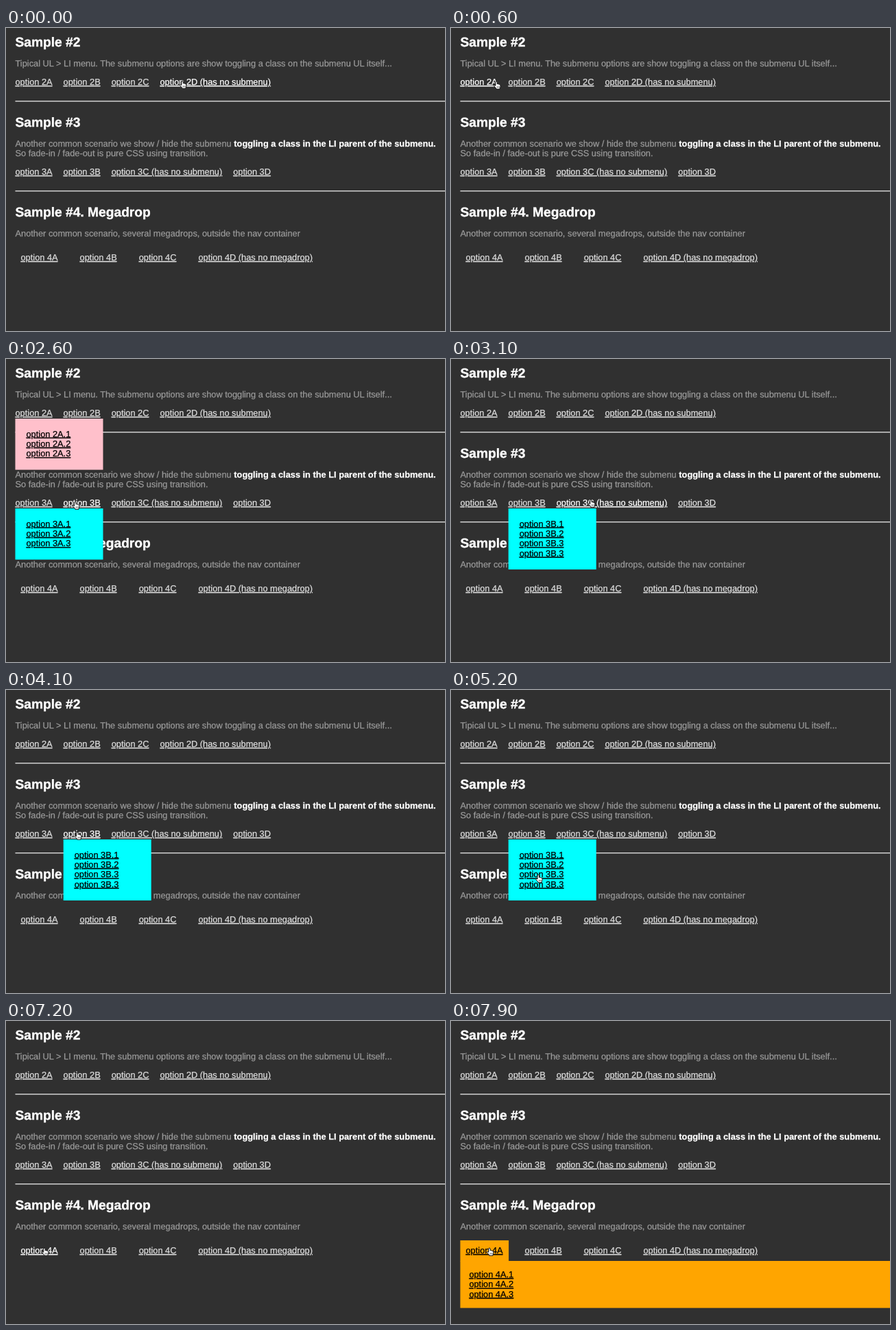
Recreate the animation shown at these times as an HTML page. Size 640 px wide and 442 px high, loop 8000 ms.

```html
<!DOCTYPE html>
<html lang="en">
<head>
<meta charset="utf-8">
<title>Menu samples</title>
<style>
  html, body { margin: 0; width: 100%; height: 100%; overflow: hidden; background: #303030; }
  svg { display: block; width: 640px; height: 442px; }
  text {
    font: 12.8px "Liberation Sans", Arial, sans-serif; text-rendering: geometricPrecision; white-space: pre;
    fill: var(--ink, #999); stroke: var(--ink, #999); stroke-width: .25px;
  }
  .title { font-size: 19.2px; font-weight: bold; --ink: #fff; stroke-width: .4px; }
  .strong { font-weight: bold; --ink: #fff; }
  .link { --ink: #ddd; text-decoration: underline; }
  .link.over { --ink: #fff; }
  .sub { --ink: #000; text-decoration: underline; }
</style>
</head>
<body>
<svg id="stage" viewBox="0 0 640 442"></svg>
<script>
const LOOP = 8000, STEP = 100, LEFT = 13.5, LINE = 14.4;
const stage = document.getElementById('stage');

function add(parent, tag, attrs, content) {
  const node = document.createElementNS('http://www.w3.org/2000/svg', tag);
  for (const key in attrs) node.setAttribute(key, attrs[key]);
  if (content) node.textContent = content;
  parent.appendChild(node);
  return node;
}
const label = (x, y, content, cls = '', parent = stage) =>
  add(parent, 'text', { x, y, class: cls }, content);
const box = (parent, x, y, width, height, fill) =>
  add(parent, 'rect', { x, y, width, height, fill });

// Page text
label(LEFT, 27, 'Sample #2', 'title');
label(LEFT, 56, 'Tipical UL > LI menu. The submenu options are show toggling a class on the submenu UL itself...');
label(LEFT, 144, 'Sample #3', 'title');
label(LEFT, 173, 'Another common scenario we show / hide the submenu ');
label(332.3, 173, 'toggling a class in the LI parent of the submenu.', 'strong');
label(LEFT, 187, 'So fade-in / fade-out is pure CSS using transition.');
label(LEFT, 275, 'Sample #4. Megadrop', 'title');
label(LEFT, 304, 'Another common scenario, several megadrops, outside the nav container');
for (const y of [106, 237]) box(stage, LEFT, y, 640, 1.5, '#d0d0d0');

// Navigation rows
const links = [];
function row(y, xs, names) {
  names.forEach((name, i) => links.push(label(xs[i], y, 'option ' + name, 'link')));
}
row(83, [13.5, 83.6, 153.7, 224.5], ['2A', '2B', '2C', '2D (has no submenu)']);
row(214, [13.5, 83.6, 153.7, 331.2], ['3A', '3B', '3C (has no submenu)', '3D']);
row(339, [21.5, 107.6, 193.7, 280.5], ['4A', '4B', '4C', '4D (has no megadrop)']);

// Dropdowns, each with its fade windows
const menus = [];
function menu(x, y, w, h, fill, pad, baseline, names, show, hide) {
  const group = add(stage, 'g', {});
  box(group, x, y, w, h, fill);
  const items = names.map((name, i) =>
    label(x + pad, baseline + i * LINE, 'option ' + name, 'sub', group));
  menus.push({ group, items, show, hide });
  return group;
}
menu(LEFT, 87, 128, 74.6, '#ffc0cb', 16, 113.5, ['2A.1', '2A.2', '2A.3'], [800, 1100], [2600, 2900]);
menu(LEFT, 218, 128, 74.6, '#0ff', 16, 244.5, ['3A.1', '3A.2', '3A.3'], [2100, 2400], [2600, 2900]);
menu(83.7, 218, 128, 89, '#0ff', 16, 244.5, ['3B.1', '3B.2', '3B.3', '3B.3'], [2700, 3000], [6400, 6700]);
const mega = menu(LEFT, 350, 640, 68.6, '#ffa500', 12.9, 374, ['4A.1', '4A.2', '4A.3'], [7300, 7600], [8000, 8001]);
box(mega, LEFT, 320, 70.6, 30.5, '#ffa500');
label(21.5, 339, 'option 4A', 'sub', mega);

// Pointers, with the hot spot at 0,0
const hand = add(stage, 'g', { stroke: '#111', 'stroke-linejoin': 'round' });
add(hand, 'path', {
  d: 'M-1.2 .8Q0-.8 1.2 .8V3.8Q2.2 3.1 3 4.1Q4.1 3.6 4.7 4.7Q5.9 4.6 5.9 6V8Q5.8 9.2 5 10V11.2H-.4V10.2L-3.4 6.8Q-3.7 5.4-2.4 5.5L-1.2 6.4Z',
  fill: '#fff'
});
add(hand, 'path', { d: 'M1 7.2V9.4M2.6 7.2V9.4M4.2 7.2V9.4', 'stroke-width': .6 });
const arrow = add(stage, 'path', {
  d: 'M0 0V12.2L2.8 9.6L4.7 13.8L6.8 12.9L5 8.8H8.8Z',
  fill: '#111', stroke: '#eee', 'stroke-width': 1, 'stroke-linejoin': 'round'
});

// Pointer stops: time, x, y
const path = [
  [0, 257, 77], [200, 257, 77], [700, 44, 78], [1400, 41, 82],
  [1600, 45, 112], [1900, 42, 206], [2300, 42, 207], [2600, 101, 208],
  [2800, 102, 208], [3100, 204, 205], [3500, 204, 205], [3900, 104, 207],
  [4400, 104, 207], [4800, 125, 240], [5400, 128, 280], [6000, 300, 244],
  [6500, 300, 244], [7200, 56, 331], [8000, 56, 331]
];
const clamp = v => Math.max(0, Math.min(1, v));
const ramp = (t, [from, to]) => clamp((t - from) / (to - from));

function pointerAt(t) {
  const i = path.findIndex(p => p[0] > t);
  const a = path[i - 1], b = path[i];
  const k = ramp(t, [a[0], b[0]]);
  const e = k * k * (3 - 2 * k);
  return [a[1] + (b[1] - a[1]) * e, a[2] + (b[2] - a[2]) * e];
}
function hits(node, x, y) {
  const b = node.getBBox();
  return x >= b.x && x <= b.x + b.width && y >= b.y && y <= b.y + b.height;
}

function draw(time) {
  const t = Math.floor(time % LOOP / STEP) * STEP;
  const [x, y] = pointerAt(t);
  let onLink = false;
  for (const link of links) {
    const over = hits(link, x, y);
    link.classList.toggle('over', over);
    onLink = onLink || over;
  }
  for (const { group, items, show, hide } of menus) {
    const alpha = ramp(t, show) * (1 - ramp(t, hide));
    group.setAttribute('opacity', alpha);
    if (alpha > 0 && items.some(item => hits(item, x, y))) onLink = true;
  }
  const place = `translate(${x} ${y})`;
  hand.setAttribute('transform', place);
  arrow.setAttribute('transform', place);
  hand.setAttribute('visibility', onLink ? 'visible' : 'hidden');
  arrow.setAttribute('visibility', onLink ? 'hidden' : 'visible');
}

const start = performance.now();
function tick() {
  draw(performance.now() - start);
  requestAnimationFrame(tick);
}
tick();
</script>
</body>
</html>
```
